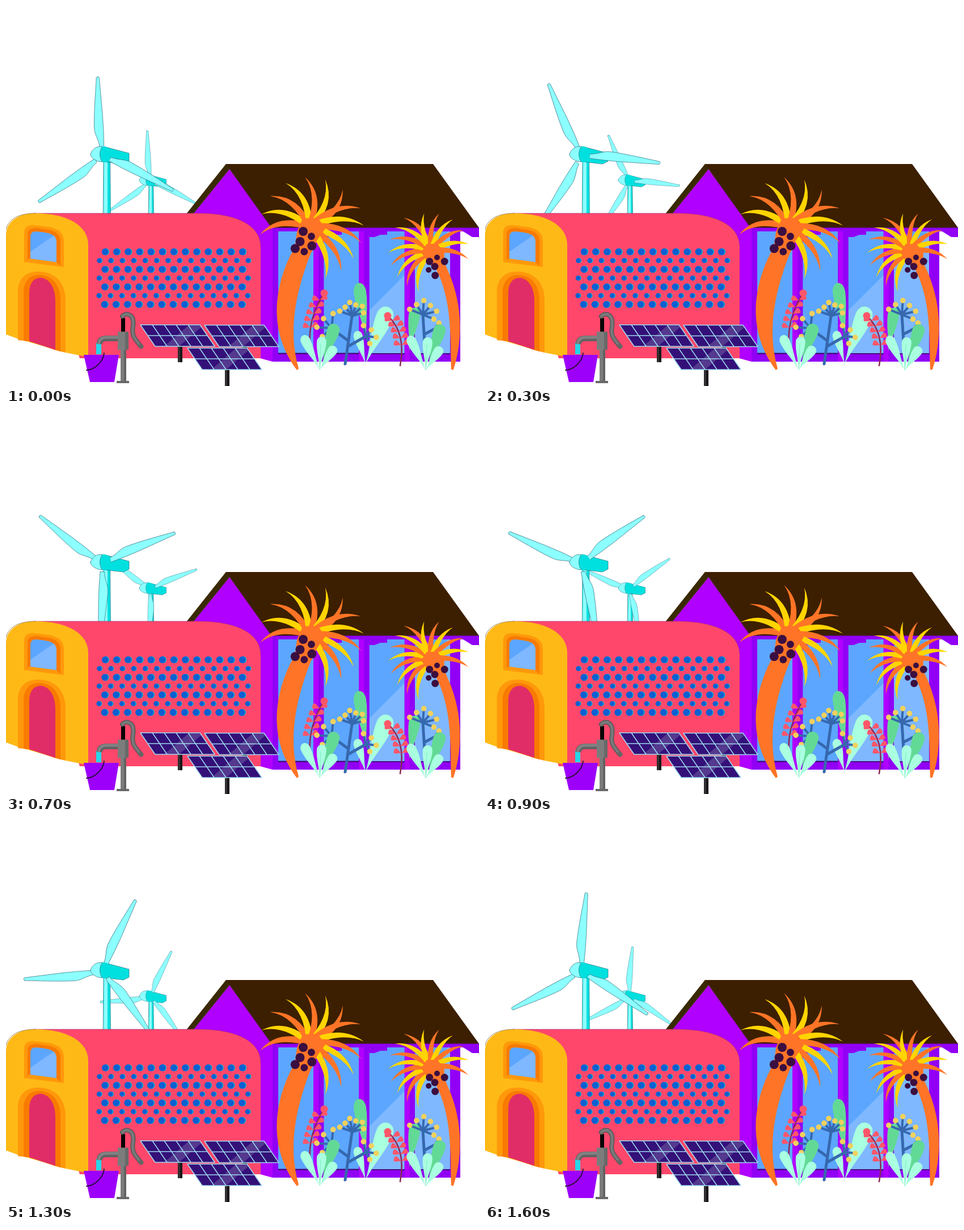
An HTML page with a canvas for the animation above (1700 ms loop, 834 px wide and 671 px high).

```html
<!DOCTYPE html>
<html lang="en">
<head>
<meta charset="utf-8">
<style>
html, body { margin: 0; width: 100%; height: 100%; overflow: hidden; background: #fff; }
canvas { display: block; }
</style>
</head>
<body>
<canvas id="stage" width="834" height="671"></canvas>
<script>
const W = 834, H = 671, STEP_MS = 100, STEPS = 17, RAD = Math.PI / 180;
const view = document.getElementById('stage').getContext('2d');
const scenery = document.createElement('canvas');
scenery.width = W;
scenery.height = H;
let g = scenery.getContext('2d');

const C = {
  light: '#8cffff', teal: '#00e0df', edge: '#35707f',
  purple: '#b000ff', violet: '#9100f5', brown: '#3c1f00',
  red: '#ff476b', amber: '#ffb916', orange: '#ff980a', rust: '#f97a00',
  glass: '#5ca6ff', shine: '#7fb8ff', palm: '#ff7426', yellow: '#ffd400',
  nut: '#3b0f40', mint: '#a9ffe0', green: '#63d996', stem: '#3668ae',
  berry: '#f2d15c', fern: '#ff5669', grey: '#7c7c7c', black: '#1c1a1c'
};

function fill(d, color) {
  g.fillStyle = color;
  g.fill(new Path2D(d));
}
function line(d, color, width, cap = 'round') {
  g.strokeStyle = color;
  g.lineWidth = width;
  g.lineCap = cap;
  g.lineJoin = 'round';
  g.stroke(new Path2D(d));
}
function rect(x, y, w, h, color) {
  g.fillStyle = color;
  g.fillRect(x, y, w, h);
}
function dot(x, y, r, color) {
  g.fillStyle = color;
  g.beginPath();
  g.arc(x, y, r, 0, Math.PI * 2);
  g.fill();
}
function clipped(d, draw) {
  g.save();
  g.clip(new Path2D(d));
  draw();
  g.restore();
}
// Calls draw(angle, index) for evenly spaced angles in degrees.
function fan(from, to, count, draw) {
  for (let i = 0; i < count; i++) draw(from + (to - from) * i / (count - 1), i);
}
const polar = (x, y, angle, r) => [x + r * Math.cos(angle * RAD), y + r * Math.sin(angle * RAD)];

// ---- Wind turbines ----
const BLADE = 'M-2.5-138Q0-141 2.5-138L4.5-70Q5-40 3.5-14L-4-15C-5-30-12-37-11.5-51C-10-82-5-115-2.5-138Z';
const NACELLE = 'M2-16L47-4V10L37 15L2 11Z';
const COLLAR = 'M-6-16L4-16C12-15 16-8 15-1C15 6 11 12 4 12L-4 11Z';
const NOSE = 'M-21-2C-20-8-13-15-7-15.5L0-16C-6-9-6 5 0 11L-8 10C-15 7-21 3-21-2Z';

function outlined(d, color) {
  fill(d, color);
  line(d, C.edge, 0.7);
}
function placed(x, y, scale, draw) {
  g.save();
  g.translate(x, y);
  g.scale(scale, scale);
  draw();
  g.restore();
}
function turbine(rotor, hub, step) {
  placed(...hub, () => outlined(NACELLE, C.teal));
  placed(...rotor, () => {
    for (let i = 0; i < 3; i++) {
      const turn = 3.4 + 120 * (i + step / STEPS);
      // The tilted rotor makes blades run ahead as they pass the tower.
      const lead = 5.2 * Math.max(0, Math.cos((turn - 168) * RAD)) ** 2;
      g.save();
      g.rotate(-(turn + lead) * RAD);
      outlined(BLADE, C.light);
      g.restore();
    }
  });
  placed(...hub, () => {
    fill(COLLAR, C.teal);
    outlined(NOSE, C.light);
  });
}
function tower(x, top, half) {
  outlined(`M${x - half} ${top}H${x + half}L${x + half + 0.7} 370H${x - half - 0.7}Z`, C.teal);
  fill(`M${x - half + 1} ${top}H${x + 1}V370H${x - half}Z`, C.light);
}
function turbines(step) {
  tower(256, 316, 3.8);
  turbine([254.5, 309, 0.64], [249.7, 309, 0.7], step);
  tower(178, 274, 5.7);
  turbine([170, 264, 1], [170, 264, 1], step);
}

// ---- Buildings ----
function glassHouse() {
  fill('M394 288L331 366L448 420V622L470 628V391Z', C.purple);
  rect(470, 391, 331, 237, C.violet);
  for (let i = 0; i < 4; i++) {
    const x = 480 + i * 80.4;
    rect(x, 398, 62, 215, C.glass);
    rect(x + 62, 398, 9, 230, i < 3 ? C.purple : C.violet);
    rect(x, 612.5, 62, 2.5, '#4b087e');
  }
  clipped('M641 398H702V613H641ZM721 398H783V613H721Z', () =>
    fill('M638 540L783 395V613H638Z', C.shine));
  fill('M470 391H834V408H822L806 398H470Z', C.violet);
  for (let x = 560; x < 800; x += 80) fill(`M${x} 391h32v13h-12l-10 4h-10Z`, C.violet);
  fill('M388 279H753L834 391.5H468L394 288L331 366H319Z', C.brown);
  fill('M388 279L319 366H331L394 288Z', '#392900');
}

function redHall() {
  fill('M50 366H340C404 366 449 386 449 425V622H130Z', C.red);
  line('M50 366H340C404 366 449 386 449 425', '#9b2878', 0.6);
  fill('M0 580V405C0 380 22 366 52 366C105 366 145 386 145 422V620L105 612L22 588Z', C.amber);
  line('M0 395C4 375 25 366 52 366', '#7a5412', 0.7);

  fill('M32 452V402C32 384 46 386 65 389C92 391 102 400 102 416V461Z', C.orange);
  fill('M38 448V404C38 391 51 391 65 394C87 396 96 402 96 416V459L89 452V415C88 404 78 401 62 399C47 397 43 399 43 408V446Z', C.rust);
  const pane = 'M43 446V408C43 398 49 397 62 399C80 401 89 405 89 417V452Z';
  fill(pane, C.glass);
  clipped(pane, () => fill('M40 436L92 400V455H40Z', C.shine));

  fill('M21 590V505C21 478 39 468 60 469C89 471 105 490 105 520V612L88 608L41 592Z', C.orange);
  fill('M31 591V507C31 484 44 474 60 475C84 477 96 494 96 521V610L87 607L41 592Z', C.rust);
  fill('M41 592V507C41 488 50 480 61 480C77 481 87 498 87 521V607Z', '#e12d67');

  for (let row = 0; row < 7; row++) {
    const small = row % 2, y = 434 + row * 15.5;
    for (let i = 0; i < 13 + small; i++) {
      const x = (small ? 165 : 175) - row * 0.2 + i * 20.17, r = small ? 4.6 : 6.2;
      dot(x + 0.9, y, r, '#12bccb');
      dot(x - 0.2, y, r - 0.2, '#0b60d2');
    }
  }
}

// ---- Pump and solar panels ----
function pump() {
  const handle = 'M205 548C213 539 227 546 224 565C221 584 228 588 237 600';
  rect(203, 551, 7, 26, '#050505');
  line(handle, '#555', 8);
  line(handle, '#797979', 5);
  dot(238, 601, 4.5, '#666');
  rect(159, 594, 9, 21, '#26d6e8');
  line('M198 587H177Q165 587 164.5 597', '#626262', 10, 'butt');
  line('M198 585H177Q165 585 163 597', '#828282', 5, 'butt');
  rect(202, 605, 10, 58, C.grey);
  rect(208, 605, 4, 58, '#636363');
  rect(197, 575, 19, 32, C.grey);
  rect(210, 575, 6, 32, '#696969');
  rect(195, 662, 22, 4, '#686868');
  fill('M137 616H199L191 664H148Z', '#9d00fa');
  line('M173 613C171 630 154 643 142 643', '#20102c', 1.8);
}

function post(x, y, h) {
  rect(x, y, 8, h, C.black);
  rect(x + 1.5, y, 1.5, h, '#49464a');
}
function panel(x, y) {
  const outline = `M${x} ${y}h105l26 38h-105Z`;
  fill(outline, '#341079');
  clipped(outline, () => fill(`M${x + 42} ${y + 38}l44 -38h26l-44 38Z`, '#54398f'));
  let grid = outline + `M${x + 13} ${y + 19}h105`;
  for (let i = 1; i < 5; i++) grid += `M${x + i * 21} ${y}l26 38`;
  line(grid, '#9ed9ed', 1.5);
}
function solarField() {
  post(303, 600, 29);
  post(417, 600, 5);
  post(386, 641, 30);
  panel(237, 563);
  panel(350, 563.5);
  panel(320, 604);
}

// ---- Palms ----
// Tapered arched blade; the sign of bend picks the side it bulges to.
function frond(x, y, angle, length, bend, width, color) {
  const base = side => polar(x, y, angle + 90, side);
  const arch = side => polar(...polar(x, y, angle, length * 0.6), angle + 90, bend * length + side);
  const tip = polar(x, y, angle, length);
  fill(`M${base(-width)}Q${arch(-width)} ${tip}Q${arch(width)} ${base(width)}Z`, color);
}
function crown(x, y, from, to, count, length, bend, width, colors) {
  fan(from, to, count, (angle, i) => frond(x, y, angle, length, bend, width, colors[i % 2]));
}
function nuts(x, y, spread, size, start) {
  fan(start, start + 224, 5, (angle, i) =>
    dot(...polar(x, y, angle, spread), size - 1.5 * (i % 2), C.nut));
  dot(x - spread / 4, y, size, C.nut);
}
function tallPalm() {
  fill('M508 428C478 482 456 566 513 643L516 640C496 570 512 500 540 430Z', C.palm);
  crown(535, 390, 171, 312, 7, 88, 0.3, 6, [C.palm, C.yellow]);
  crown(535, 390, 340, 433, 6, 96, -0.26, 6, [C.palm, C.yellow]);
  fill('M513 399L523 375L550 374L563 393L548 414L539 435H508Z', C.palm);
  nuts(523, 416, 18, 8, -87);
}
function shortPalm() {
  fill('M757 462C788 520 783 590 785 642H789C806 590 807 520 773 454Z', C.palm);
  crown(750, 432, 107, 230, 8, 76, 0.26, 5, [C.yellow, C.palm]);
  crown(750, 432, 259, 373, 6, 67, -0.22, 5, [C.yellow, C.palm]);
  fill('M732 435L742 420L761 420L773 436L772 458L757 466L740 447Z', C.palm);
  nuts(760, 460, 16, 6.5, 102);
}

// ---- Garden ----
function leaf(x, y, angle, length, width, color) {
  const at = (k, side) => polar(...polar(x, y, angle, length * k), angle + 90, width * side);
  fill(`M${x} ${y}C${at(0.35, 0.25)} ${at(0.55, 1)} ${at(0.85, 1)}C${at(1.05, 0.9)} ${at(1.05, -0.9)} ${at(0.85, -1)}C${at(0.55, -1)} ${at(0.35, -0.25)} ${x} ${y}Z`, color);
}
function bush(x, y) {
  leaf(x + 5, y - 10, 288, 74, 11, C.green);
  fan(244, 304, 3, (angle, i) => leaf(x, y, angle, 67 - 9 * i, 8.5, C.mint));
  line(`M${x} ${y}l2 -45`, '#85eac4', 1);
}
function fern(x, y, cx, cy, tx, ty) {
  line(`M${x} ${y}Q${cx} ${cy} ${tx} ${ty}`, '#8c2855', 2.5);
  const mix = (a, b, c, k) => (1 - k) ** 2 * a + 2 * k * (1 - k) * b + k * k * c;
  for (let k = 0.34; k < 0.95; k += 0.13) {
    const px = mix(x, cx, tx, k), py = mix(y, cy, ty, k);
    leaf(px, py, 200, 14, 4.8, C.fern);
    leaf(px, py, 330, 14, 4.8, C.fern);
  }
  dot(tx, ty, 6.5, C.fern);
}
function berries(x, y, from, to, count, length) {
  fan(from, to, count, (angle, i) => {
    const [bx, by] = polar(x, y, angle, length + 2 - 4 * (i % 2));
    line(`M${x} ${y}L${bx} ${by}`, C.stem, 4);
    dot(bx, by, 4.8, C.berry);
  });
}
function garden() {
  leaf(636, 590, 262, 102, 11, C.green);
  leaf(634, 632, 292, 108, 15, C.mint);
  leaf(634, 632, 255, 60, 8, C.mint);
  leaf(711, 610, 278, 78, 10, C.green);
  fern(536, 600, 532, 552, 561, 507);
  fern(695, 635, 706, 577, 673, 547);

  line('M598 632L610 548M602 590L572 568M605 600L635 583', C.stem, 5);
  berries(611, 547, 200, 345, 6, 22);
  berries(574, 569, 92, 276, 5, 24);
  berries(634, 583, 259, 420, 4, 17);
  line('M738 592L735 545M737 580L756 570', C.stem, 5);
  berries(735, 545, 202, 382, 6, 23);
  berries(755, 571, 307, 436, 3, 12);

  bush(553, 642);
  bush(740, 643);
}

glassHouse();
redHall();
solarField();
pump();
shortPalm();
tallPalm();
garden();

g = view;
function render() {
  const step = Math.floor(performance.now() / STEP_MS) % STEPS;
  rect(0, 0, W, H, '#fff');
  turbines(step);
  g.drawImage(scenery, 0, 0);
  requestAnimationFrame(render);
}
render();
</script>
</body>
</html>
```
